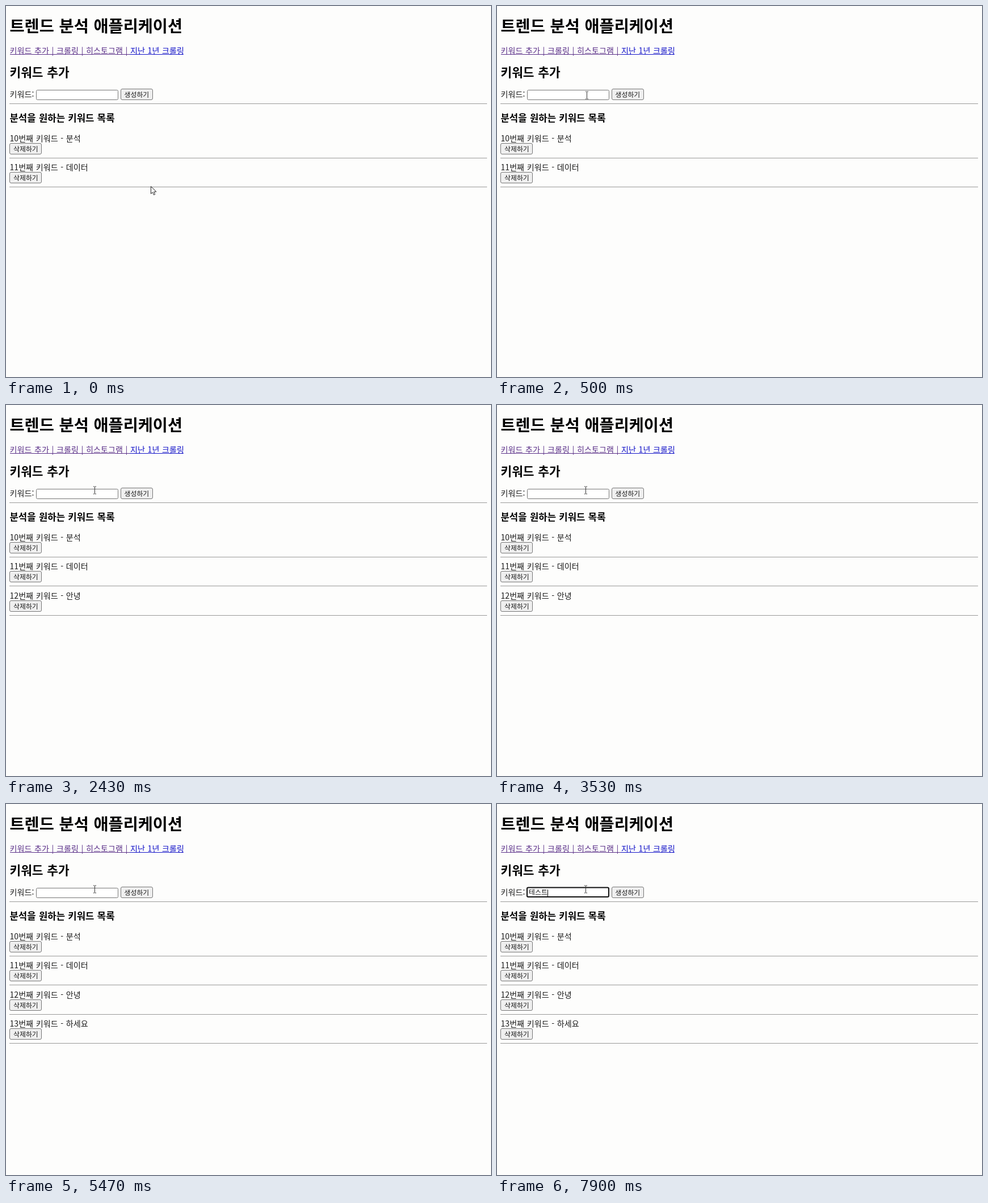
These frames come from a looping animation (855x655 px, 8 s). An HTML page:

```html
<!DOCTYPE html>
<html lang="ko">
<head>
<meta charset="utf-8">
<style>
  html, body { margin: 0; width: 100%; height: 100%; overflow: hidden; background: #fdfdfc; }
  svg { display: block; font: 350 14.1px "Noto Sans CJK KR", "Noto Sans CJK JP", sans-serif; word-spacing: .7px; }
  text { fill: #1c1c1c; }
  .bold { font-weight: 700; fill: #000; }
  .small { font-size: 11.9px; }
  .button { fill: #efefef; stroke: #767676; }
  .line { fill: #999; }
  .visited { fill: #5a2f88; }
  .link { fill: #1414c8; }
  #box { fill: #fff; }
</style>
</head>
<body>
<svg width="855" height="655">
  <text class="bold" x="6.5" y="46" font-size="28.4">트렌드 분석 애플리케이션</text>
  <text x="6.5" y="84"><tspan class="visited">키워드 추가 | 크롤링 | 히스토그램 | </tspan><tspan class="link">지난 1년 크롤링</tspan></text>
  <rect class="visited" x="7" y="85" width="211" height="1"/>
  <rect class="link" x="218" y="85" width="95" height="1"/>
  <text class="bold" x="6.5" y="125" font-size="21.4">키워드 추가</text>
  <text x="6.5" y="161">키워드:</text>
  <rect id="box"/>
  <text id="value" class="small" x="56" y="160"></text>
  <rect id="caret" y="151" width="1" height="12"/>
  <rect class="button" x="202.5" y="146.5" width="56" height="19" rx="2.5"/>
  <text class="small" x="208.5" y="160.5">생성하기</text>
  <rect class="line" x="6" y="172" width="842" height="1"/>
  <text class="bold" x="6.5" y="204" font-size="16.7">분석을 원하는 키워드 목록</text>
  <g id="list"></g>
  <path id="arrow" d="M0 0V13L3 10.3L5 15L7.2 14L5.2 9.5H9.5Z" fill="#fff" stroke="#222"/>
  <path id="beam" d="M-2.5 -6.5H-.5M.5 -6.5H2.5M0 -6V6M-2.5 6.5H-.5M.5 6.5H2.5" fill="none" stroke="#333"/>
</svg>
<script>
const $ = id => document.getElementById(id);
const LOOP = 8000;

// [time, text in the field]; null means the field has no focus
const typing = [
  [0, null], [670, ''], [1330, 'ㅇ'], [1600, '아'], [1700, '안'],
  [1930, '안ㄴ'], [2030, '안녀'], [2100, '안녕'], [2270, null],
  [3570, ''], [4570, 'ㅎ'], [4670, '하'], [4830, '핫'], [4900, '하세'],
  [5000, '하셍'], [5100, '하세요'], [5330, null],
  [6600, ''], [7300, 'ㅌ'], [7330, '테'], [7530, '텟'], [7630, '테스'],
  [7800, '테슽'], [7870, '테스트']
];

// [word, time it joins the list]
const words = [['분석', 0], ['데이터', 0], ['안녕', 2270], ['하세요', 5330]];

$('list').innerHTML = words.map(([word], i) => {
  const y = Math.round(51.5 * i - .2);
  return `<g transform="translate(0 ${y})">
    <text x="6.5" y="239">${10 + i}번째 키워드 - ${word}</text>
    <rect class="button" x="6.5" y="242.5" width="56" height="19" rx="2.5"/>
    <text class="small" x="13" y="256.5">삭제하기</text>
    <rect class="line" x="6" y="268" width="842" height="1"/></g>`;
}).join('');
const rows = [...$('list').children];

function setAttrs(el, attrs) {
  for (const name in attrs) el.setAttribute(name, attrs[name]);
}
const show = (el, on) => el.setAttribute('visibility', on ? 'visible' : 'hidden');

function ease(t, from, to) {
  const k = Math.min(1, Math.max(0, (t - from) / (to - from)));
  return k * k * (3 - 2 * k);
}

function drawField(t) {
  const [since, text] = typing.findLast(step => step[0] <= t);
  const focus = text !== null;
  setAttrs($('box'), focus
    ? { x: 53, y: 147.5, width: 144, height: 16.5, rx: 2, stroke: '#101010', 'stroke-width': 2 }
    : { x: 53.5, y: 148.5, width: 144, height: 17, rx: 2, stroke: '#767676', 'stroke-width': 1 });
  $('value').textContent = text || '';
  $('caret').setAttribute('x', 56 + Math.round(11 * (text || '').length));
  show($('caret'), focus && (t - since) % 1000 < 500);
}

function drawPointer(t) {
  const a = ease(t, 30, 470), b = ease(t, 510, 670);
  const x = Math.round(255 - 97 * a - 2 * b) + .5;
  const y = Math.round(318 - 161 * a - 7 * b) + .5;
  const overField = x < 198 && y < 167;
  for (const id of ['arrow', 'beam']) {
    $(id).setAttribute('transform', `translate(${x} ${y})`);
    show($(id), (id === 'beam') === overField);
  }
}

function draw(now) {
  const t = now % LOOP;
  drawField(t);
  drawPointer(t);
  rows.forEach((row, i) => show(row, t >= words[i][1]));
  requestAnimationFrame(draw);
}
draw(0);
</script>
</body>
</html>
```
